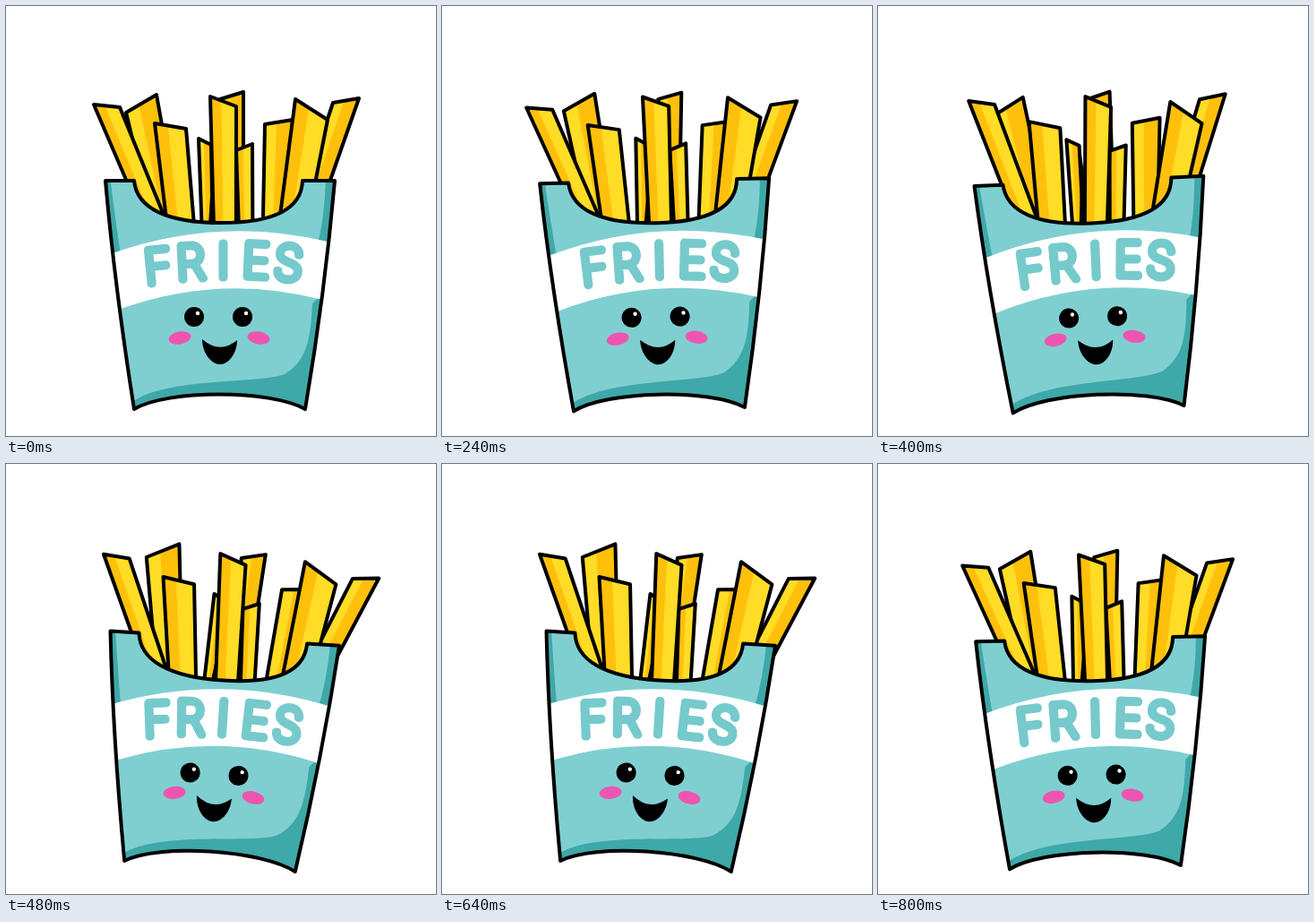
An HTML page with a canvas for the animation above (880 ms loop, 480 by 480 pixels).

```html
<!DOCTYPE html>
<html lang="en">
<head>
<meta charset="utf-8">
<title>Dancing fries</title>
<style>
  html, body { margin: 0; width: 100%; height: 100%; overflow: hidden; background: #fff; }
  canvas { display: block; width: 480px; height: 480px; }
</style>
</head>
<body>
<canvas id="stage" width="480" height="480"></canvas>
<script>
const ctx = document.getElementById('stage').getContext('2d');
const STEP = 80, STEPS = 11;
const TEAL = '#7fcfd1', SHADE = '#3fa8a8', YELLOW = '#ffdc25', ORANGE = '#ffc00c';

// Tilt of the box, and extra tilt of the front and back fries, in radians.
function poseAt(step) {
  if (step < 3) return { box: 0, front: 0, back: 0 };
  if (step === 3 || step === STEPS - 1) return { box: -0.023, front: 0, back: 0.042 };
  if (step % 2 === 0) return { box: 0.064, front: 0, back: 0.088 };
  return { box: -0.044, front: step === 7 ? -0.036 : 0.075, back: 0.01 };
}

function rotateAbout(x, y, angle) {
  ctx.translate(x, y);
  ctx.rotate(angle);
  ctx.translate(-x, -y);
}

function fill(path, color) {
  ctx.fillStyle = color;
  ctx.fill(new Path2D(path));
}

function ellipse(x, y, rx, ry, angle, color) {
  ctx.beginPath();
  ctx.ellipse(x, y, rx, ry, angle, 0, Math.PI * 2);
  ctx.fillStyle = color;
  ctx.fill();
}

// A fry has a slanted top edge; its foot is drawn in towards the middle of the box.
function fry(x, y, width, drop, leftColor, rightColor) {
  const footY = 255, split = 0.42, spread = 85;
  const footWidth = width * 0.85;
  const foot = 251 + spread * Math.tanh((x + width / 2 - 249) / spread) - footWidth / 2;
  const slice = part =>
    `M${x} ${y}L${x + width * part} ${y + drop * part}L${foot + footWidth * part} ${footY}H${foot}Z`;
  fill(slice(1), rightColor);
  fill(slice(split), leftColor);
  ctx.stroke(new Path2D(slice(1)));
}

const frontFry = (x, y, width, drop) => fry(x, y, width, drop, ORANGE, YELLOW);
const backFry = (x, y, width, drop) => fry(x, y, width, drop, YELLOW, ORANGE);

function drawBackFries() {
  backFry(239, 104, 26, -8);
  backFry(215, 148, 14, 7);
  backFry(134, 119, 34, -20);
  backFry(289, 132, 31, -5);
  backFry(365, 108, 29, -5);
  fill('M231 165L240 245H226Z', '#000');
}

function drawFrontFries() {
  frontFry(98, 110, 29, 3);
  frontFry(166, 131, 35, 6);
  frontFry(257, 161, 18, -7);
  frontFry(228, 101, 29, 11);
  frontFry(323, 104, 36, 23);
}

function swing(angle, drawFries) {
  ctx.save();
  rotateAbout(240, 250, angle);
  drawFries();
  ctx.restore();
}

const box = new Path2D('M111 195H143C146 226 180 242 240 242C300 242 330 226 331 195' +
  'H367Q356 320 334 450C295 428 180 428 143 450Q121 310 111 195Z');

function drawBox() {
  ctx.save();
  ctx.clip(box);
  fill('M100 180H380V470H100Z', TEAL);
  fill('M108 190H116Q121 230 128 278H114Z', SHADE);
  fill('M357 190H372V270H347Q356 235 357 190Z', SHADE);
  fill('M356 318L342 332C340 372 336 396 311 411C283 422 180 414 141 442V470H360Z', SHADE);
  fill('M116 277Q238 233 364 264L354 328Q240 298 128 338Z', '#fff');
  ctx.restore();
  ctx.stroke(box);
}

function drawLabel() {
  ctx.save();
  ctx.font = '100 52px Inter, sans-serif';
  ctx.textAlign = 'center';
  ctx.fillStyle = ctx.strokeStyle = '#76cacc';
  ctx.lineWidth = 9;
  [...'FRIES'].forEach((char, i) => {
    const k = i - 2;
    ctx.save();
    ctx.translate(242.5 + 36.5 * k, 283.5 + 1.2 * k * k - 0.9 * k);
    ctx.rotate(0.05 * k);
    ctx.fillText(char, 0, 19);
    ctx.strokeText(char, 0, 19);
    ctx.restore();
  });
  ctx.restore();
}

function drawFace() {
  for (const x of [210, 264]) {
    ellipse(x, 347, 11, 11, 0, '#000');
    ellipse(x + 4, 343, 2.2, 2.2, 0, '#fff');
  }
  for (const side of [-1, 1]) {
    ellipse(238 + 44 * side, 370.5, 12.5, 7, 0.18 * side, '#ee55b0');
  }
  fill('M219 372Q239 389 258 373C258 387 249 400 239 400C229 400 219 387 219 372Z', '#000');
}

function draw(pose) {
  ctx.setTransform(1, 0, 0, 1, 0, 0);
  ctx.fillStyle = '#fff';
  ctx.fillRect(0, 0, 480, 480);
  ctx.strokeStyle = '#000';
  ctx.lineWidth = 4;
  ctx.lineJoin = 'round';
  rotateAbout(248, 277, pose.box);
  swing(pose.back, drawBackFries);
  swing(pose.front, drawFrontFries);
  drawBox();
  drawLabel();
  drawFace();
}

const start = performance.now();
function tick() {
  const elapsed = performance.now() - start;
  draw(poseAt(Math.floor(elapsed / STEP) % STEPS));
  requestAnimationFrame(tick);
}
tick();
</script>
</body>
</html>
```
